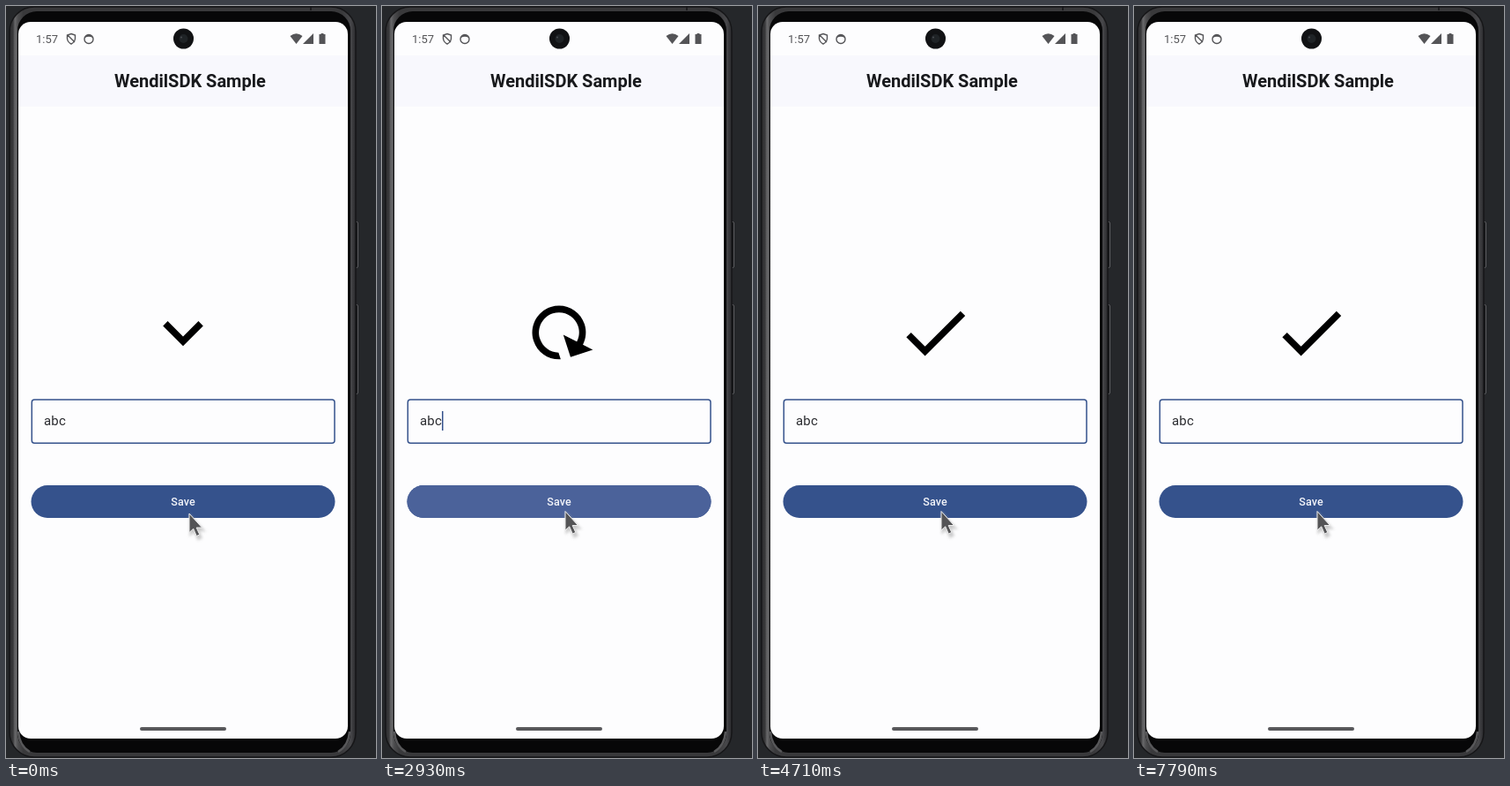
Animation, 420 px wide and 852 px high, one loop 7.81 s. Source, as an HTML page:

```html
<!DOCTYPE html>
<html lang="en">
<head>
<meta charset="utf-8">
<style>
html, body { margin: 0; width: 100%; height: 100%; overflow: hidden; background: #25272a; }
svg { display: block; width: 420px; height: 852px; font-family: Roboto, sans-serif; }
</style>
</head>
<body>
<svg viewBox="0 0 420 852">
  <defs>
    <linearGradient id="metal" gradientUnits="userSpaceOnUse" x1="4" x2="397">
      <stop offset="0" stop-color="#2e2e30"/>
      <stop offset=".01" stop-color="#38383a"/>
      <stop offset=".016" stop-color="#68686a"/>
      <stop offset=".025" stop-color="#4c4c4e"/>
      <stop offset=".04" stop-color="#39393b"/>
      <stop offset=".96" stop-color="#39393b"/>
      <stop offset=".985" stop-color="#48484b"/>
      <stop offset="1" stop-color="#2a2a2d"/>
    </linearGradient>
    <radialGradient id="ripple" gradientUnits="userSpaceOnUse" cx="205" cy="561" r="100">
      <stop offset=".5" stop-color="#4b629a"/>
      <stop offset="1" stop-color="#4b629a" stop-opacity="0"/>
    </radialGradient>
    <filter id="soft" x="-50%" y="-50%" width="200%" height="200%"><feGaussianBlur stdDeviation="1.4"/></filter>
  </defs>

  <!-- phone body -->
  <rect width="420" height="852" fill="#25272a"/>
  <g fill="#17181a" stroke="#5c5d60">
    <rect x="396" y="244.500" width="3.500" height="52" rx="1.500"/>
    <rect x="396" y="338.500" width="3.500" height="101" rx="1.500"/>
  </g>
  <rect x="4" y="1" width="393" height="850" rx="28" fill="url(#metal)" stroke="#161618" stroke-width="1.500"/>
  <path d="M346 0V5" stroke="#161618" stroke-width="1.500"/>
  <rect x="13" y="6" width="378" height="840" rx="22" fill="#070708"/>
  <path d="M14 822Q15 838 27 845M390 822Q389 838 377 845" fill="none" stroke="#58585a" stroke-width="2.500"/>

  <!-- screen -->
  <rect x="14" y="18" width="374" height="812" rx="14" fill="#fdfdfe"/>
  <rect x="14" y="56" width="374" height="58" fill="#f8f8fd"/>
  <circle cx="201.500" cy="37" r="11.500" fill="#111214"/>
  <circle cx="201.500" cy="37" r="5" fill="#1f2326"/>
  <circle cx="199" cy="35.500" r="1" fill="#484c50"/>
  <g fill="#545457">
    <text x="34" y="42" font-size="13">1:57</text>
    <path d="M322.500 34Q329.500 28.500 336.500 34L329.500 43Z"/>
    <path d="M349 31V43H337Z"/>
    <path d="M357.500 32V31H360.500V32H362.500V43H355.500V32Z"/>
    <path d="M89.500 36A4.700 4.700 0 0 1 98.500 36Q94 33.500 89.500 36Z"/>
  </g>
  <g fill="none" stroke="#545457" stroke-width="1.400">
    <path d="M74 31.500L78.500 33V37Q78 41 74 43Q70 41 69.500 37V33ZM70 33L78 41"/>
    <circle cx="94" cy="37.500" r="5"/>
  </g>
  <text x="123" y="92" font-size="20" font-weight="700" fill="#18191c">WendilSDK Sample</text>

  <path id="icon"/>

  <rect x="29.300" y="446" width="343.700" height="49.200" rx="3" fill="none" stroke="#35528c" stroke-width="1.500"/>
  <text x="43" y="475" font-size="15" letter-spacing=".2" fill="#2a2b2f">abc</text>
  <rect id="caret" x="68" y="459" width="1.500" height="22" fill="#35528c"/>

  <rect x="28.500" y="543" width="345" height="37" rx="18.500" fill="#35528c"/>
  <rect id="wave" x="28.500" y="543" width="345" height="37" rx="18.500" fill="url(#ripple)"/>
  <text x="201" y="566" font-size="12.500" font-weight="500" letter-spacing=".1" text-anchor="middle" fill="#f4f5fa">Save</text>

  <rect x="152" y="817" width="98" height="4" rx="2" fill="#58585b"/>

  <g id="mouse">
    <path d="M209 575V597L214 593L218 602L222 600L218.500 592H225Z" fill="#999" stroke="#bbb" stroke-width="2" opacity=".6" filter="url(#soft)"/>
    <path d="M208 572.500V594L212.700 589.800L216.300 598L219.800 596.400L216.200 588.500H222.500Z" fill="#545456" stroke="#eee" stroke-width="1"/>
  </g>
</svg>
<script>
const LOOP = 7810;
// Icons on a 24-unit grid
const CHEVRON = "M16.59 8.59 12 13.17 7.41 8.59 6 10l6 6 6-6z";
const REFRESH = "M17.65 6.35C16.2 4.9 14.21 4 12 4c-4.42 0-7.99 3.58-7.99 8s3.57 8 7.99 8c3.73 0 6.84-2.55 7.73-6h-2.08c-.82 2.33-3.04 4-5.65 4-3.31 0-6-2.69-6-6s2.69-6 6-6c1.66 0 3.14.69 4.22 1.78L13 11h7V4z";
const CHECK = "M9 16.17 4.83 12l-1.42 1.41L9 19 21 7l-1.41-1.41z";

const el = id => document.getElementById(id);
const set = (id, name, value) => el(id).setAttribute(name, value);
const clamp = x => Math.max(0, Math.min(1, x));

// Playback holds its steps for 100, 20 and 20 ms in turn
function stepAt(t) {
  const u = t - 2230, k = Math.floor(u / 140), r = u - 140 * k;
  return 3 * k + (r < 100 ? 0 : r < 120 ? 1 : 2);
}

function draw(t) {
  const n = stepAt(t);
  const spinning = n >= -5 && n < 50;
  const angle = spinning ? 6 * Math.max(0, n - 3) : 0;
  set("icon", "d", spinning ? REFRESH : n < 0 ? CHEVRON : CHECK);
  set("icon", "transform", `translate(201 370) rotate(${angle}) scale(3.8) translate(-12 -12)`);

  const blink = (n + 120) % 60;
  set("caret", "opacity", blink >= 14 && blink < 44 ? 1 : 0);

  const grow = clamp((n + 7) / 18);
  set("ripple", "r", 40 + 420 * grow * grow);
  set("wave", "opacity", clamp((n + 7) / 5) * (1 - clamp((n - 29) / 18)));
  set("mouse", "transform", `translate(0 ${n < -12 ? 2.5 : 0})`);
}

const start = performance.now();
function tick() {
  draw((performance.now() - start) % LOOP);
  requestAnimationFrame(tick);
}
tick();
</script>
</body>
</html>
```
